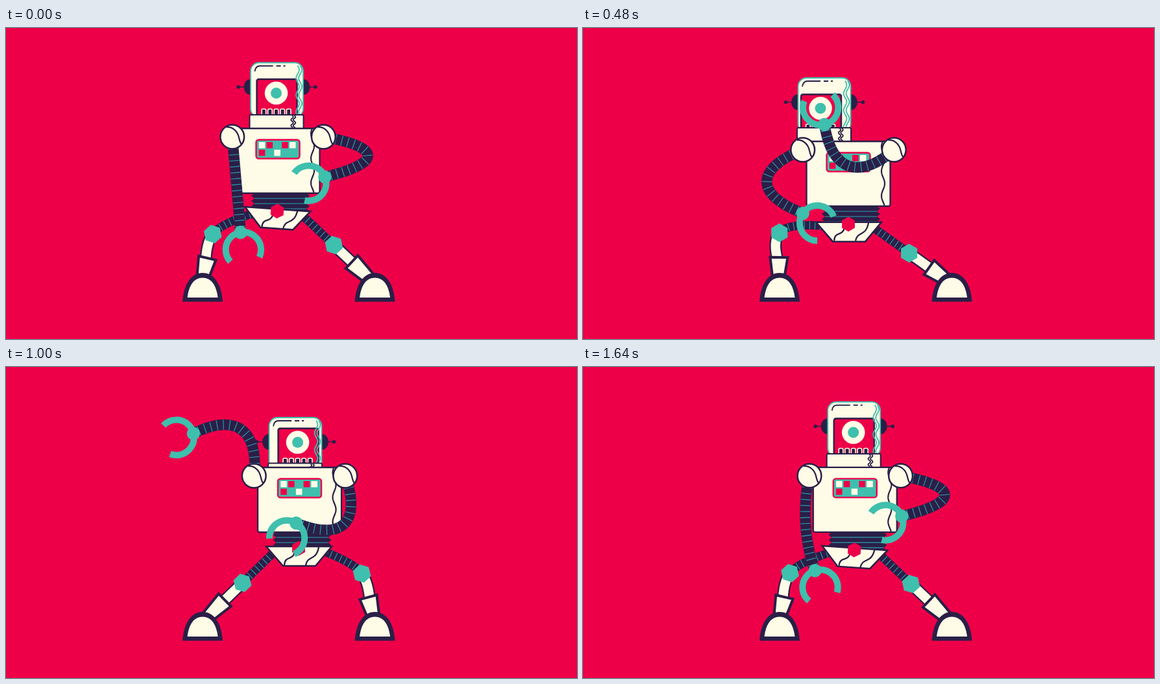
An HTML page with a canvas that plays this animation: 880 by 480 pixels, repeating every 1.68 s.

```html
<!DOCTYPE html>
<html lang="en">
<head>
<meta charset="utf-8">
<title>Robot dance</title>
<style>
html, body { margin: 0; width: 100%; height: 100%; overflow: hidden; background: #ee0049; }
canvas { display: block; width: 880px; height: 480px; }
</style>
</head>
<body>
<canvas id="stage" width="880" height="480"></canvas>
<script>
const g = document.getElementById('stage').getContext('2d');
const RED = '#ee0049', INK = '#2a1f47', CREAM = '#fefce6', TEAL = '#3fbfad', STRIPE = '#2d9fb4';
const LOOP = 1680, STEP = 40;
const ARM = 148, THIGH = 72, SHIN = 79, ANKLE_Y = 395, FOOT_Y = 422.5;

// Key poses; a field left out is interpolated across the gap.
// x, y: chest    lean, look, sink: head, face and head drop    swing, tilt: hips
// left, right: arm angle    leftLen, rightLen: reach    twist: right wrist
const poses = [
  { t: 0, x: 419, y: 168, lean: -1.5, look: 0, sink: 0, swing: -1, tilt: 4,
    left: 85, leftLen: 148, right: 88, rightLen: 62, twist: 4 },
  { t: 160, x: 414.5, y: 174, lean: -23.5, sink: 0, tilt: 4, left: 86, leftLen: 148, right: 115, rightLen: 44 },
  { t: 480, x: 409, y: 188, lean: -37, look: -5, sink: 3.5, swing: 0, tilt: 0,
    left: 90, leftLen: 98, right: 200, rightLen: 114, twist: 9 },
  { t: 680, x: 458, y: 193, lean: 14.5, sink: 4.5, swing: 8, tilt: 0,
    left: 83, leftLen: 104, right: 220, rightLen: 107, twist: 111 },
  { t: 1000, x: 452.5, y: 168, lean: -6.5, look: 4.5, sink: 24.5, swing: -1.5, tilt: 0,
    left: 215, leftLen: 114, right: 136, rightLen: 105, twist: 293 },
  { t: 1120, left: 227, leftLen: 146 },
  { t: 1320, x: 448, y: 156.5, lean: -7.5, sink: 59, swing: -9, tilt: 4,
    left: 226, leftLen: 148, right: 129, rightLen: 109, twist: 286 },
  { t: 1480, left: 156, leftLen: 106 }
];
poses.push({ ...poses[0], t: 1660, twist: poses[0].twist + 360 });

const tracks = {};
for (const name of Object.keys(poses[0])) {
  tracks[name] = poses.filter(p => name in p).map(p => [p.t, p[name]]);
}

// Monotone cubic interpolation, at rest at both ends.
function sample(keys, t) {
  let i = 0;
  while (i < keys.length - 2 && t >= keys[i + 1][0]) i++;
  const slope = k => (keys[k + 1][1] - keys[k][1]) / (keys[k + 1][0] - keys[k][0]);
  const tangent = k => {
    if (k === 0 || k === keys.length - 1) return 0;
    const p = slope(k - 1), q = slope(k);
    return p * q > 0 ? 2 * p * q / (p + q) : 0;
  };
  const [[t0, a], [t1, b]] = [keys[i], keys[i + 1]];
  const h = t1 - t0, u = Math.min(1, (t - t0) / h), w = 1 - u;
  return a * w * w * (1 + 2 * u) + b * u * u * (3 - 2 * u) + h * u * w * (w * tangent(i) - u * tangent(i + 1));
}

const rad = deg => deg * Math.PI / 180;
const clamp = (v, lo, hi) => Math.max(lo, Math.min(hi, v));

function paint(fill, stroke, width) {
  if (fill) { g.fillStyle = fill; g.fill(); }
  if (stroke) { g.strokeStyle = stroke; g.lineWidth = width; g.stroke(); }
}
function box(x, y, w, h, r, fill, stroke, width) {
  g.beginPath(); g.roundRect(x, y, w, h, r); paint(fill, stroke, width);
}
function disc(x, y, r, fill, stroke, width) {
  g.beginPath(); g.arc(x, y, r, 0, 7); paint(fill, stroke, width);
}
function poly(points, fill, stroke, width) {
  g.beginPath();
  points.forEach(p => g.lineTo(p[0], p[1]));
  g.closePath(); paint(fill, stroke, width);
}
function shape(d, fill, stroke, width) {
  const p = new Path2D(d);
  if (fill) { g.fillStyle = fill; g.fill(p); }
  if (stroke) { g.strokeStyle = stroke; g.lineWidth = width; g.stroke(p); }
}
function at(x, y, deg, draw) {
  g.save(); g.translate(x, y); g.rotate(rad(deg)); draw(); g.restore();
}
function hex(x, y, r, deg, fill) {
  at(x, y, deg, () => poly([0, 1, 2, 3, 4, 5].map(i => {
    const a = rad(i * 60 - 90);
    return [r * Math.cos(a), r * Math.sin(a)];
  }), fill));
}
function wave(x, y0, y1, amp, period, color, width, phase = 0) {
  g.beginPath();
  for (let y = y0; y <= y1; y++) g.lineTo(x + amp * Math.sin((y - y0 + phase) / period * 2 * Math.PI), y);
  paint(null, color, width);
}

// Ribbed hose along a cubic curve, with evenly spaced rings.
function hose(a, b, c, d, width, rings) {
  const pts = [], len = [0], N = 60;
  for (let i = 0; i <= N; i++) {
    const u = i / N, w = 1 - u;
    pts.push([0, 1].map(k => w * w * w * a[k] + 3 * w * w * u * b[k] + 3 * w * u * u * c[k] + u * u * u * d[k]));
    if (i) len.push(len[i - 1] + Math.hypot(pts[i][0] - pts[i - 1][0], pts[i][1] - pts[i - 1][1]));
  }
  g.beginPath(); pts.forEach(p => g.lineTo(p[0], p[1])); paint(null, INK, width);
  g.beginPath();
  for (let n = 1, i = 1; n < rings; n++) {
    const s = len[N] * n / rings;
    while (len[i] < s) i++;
    const p = pts[i - 1], q = pts[i], seg = len[i] - len[i - 1], f = (s - len[i - 1]) / seg;
    const dx = (q[0] - p[0]) / seg, dy = (q[1] - p[1]) / seg, r = width / 2 - .5;
    const x = p[0] + (q[0] - p[0]) * f, y = p[1] + (q[1] - p[1]) * f;
    g.moveTo(x - dy * r, y + dx * r); g.lineTo(x + dy * r, y - dx * r);
  }
  paint(null, STRIPE, 1.1);
}

// Two-bone leg on a fixed foot; the shin stretches when the leg is straight.
function leg(hx, hy, footX, ankleX, side, turn) {
  const vx = ankleX - hx, vy = ANKLE_Y - hy, reach = Math.hypot(vx, vy), ux = vx / reach, uy = vy / reach;
  const shin = Math.max(SHIN, reach - THIGH);
  const along = (THIGH * THIGH - shin * shin + reach * reach) / (2 * reach);
  const out = side * Math.sqrt(Math.max(0, THIGH * THIGH - along * along));
  const kx = hx + ux * along + uy * out, ky = hy + uy * along - ux * out;
  const dx = (kx - ankleX) / shin, dy = (ky - ANKLE_Y) / shin, cuff = shin - 38;

  const bx = kx - ux * 20, by = ky - uy * 20;
  const toBend = (x, y) => [x + (bx - x) * 2 / 3, y + (by - y) * 2 / 3];
  hose([hx, hy], toBend(hx, hy), toBend(kx, ky), [kx, ky], 13, 9);

  g.beginPath(); g.moveTo(kx, ky);
  g.quadraticCurveTo(kx + ux * 18, ky + uy * 18, ankleX + dx * (cuff - 10), ANKLE_Y + dy * (cuff - 10));
  paint(null, INK, 19); paint(null, CREAM, 14.5);

  at(ankleX, ANKLE_Y, Math.atan2(dy, dx) * 180 / Math.PI + 90, () =>
    poly([[-13.5, -cuff], [13.5, -cuff], [8.5, -6], [-8.5, -6]], CREAM, INK, 4));
  hex(kx, ky, 14.5, turn, TEAL);

  at(footX, FOOT_Y, 0, () => {
    shape('M-31 0C-29 -27 -18 -44.500 0 -44.500S29 -27 31 0Z', INK);
    shape('M-23.500 -6.500C-21 -26 -13 -37 0 -37S21 -26 23.500 -6.500Z', CREAM);
  });
}

function bellows(x, y, len) {
  const edge = s => {
    const pts = [];
    for (let h = 0; h <= len; h += 4) pts.push([s * (h / 4 % 2 ? 45 : 40), h]);
    return pts;
  };
  at(x, y, 0, () => {
    poly(edge(-1).concat(edge(1).reverse()), INK);
    g.beginPath();
    for (let h = 8; h < len; h += 8) { g.moveTo(-40, h); g.lineTo(40, h); }
    paint(null, STRIPE, 1.1);
  });
}

function pelvis(x, y, tilt) {
  at(x, y, tilt, () => {
    poly([[-50, -3], [51, -3], [26, 27], [-24, 27]], CREAM, INK, 2.5);
    shape('M-22 26C-21 10 -9 20 -6 5M11 26C14 10 27 20 31 -2', null, INK, 2.3);
    hex(0, 0, 11.5, 0, RED);
  });
}

// Sinking into the chest, the head first takes the neck along, then the face slides up.
function head(x, chestY, sink, look) {
  const drop = Math.max(0, sink - 5), shift = -Math.min(11, drop * .45);
  at(x, chestY - 115 + sink, 0, () => {
    for (const s of [-1, 1]) {
      g.beginPath(); g.ellipse(s * 41, 38, 10, 12, 0, 0, 7); paint(INK);
      g.beginPath(); g.moveTo(s * 48, 38); g.lineTo(s * 59, 38); paint(null, INK, 1.5);
      disc(s * 59.5, 38, 2.8, INK);
    }
    box(-40.5, .5, 81, 84, 13, CREAM, TEAL, 1.8);
    shape('M-34 14Q-33 5.500 -26 5.500H-6M-1 5.500H6M10 5.500H13', null, INK, 1.8);
    at(look, shift, 0, () => {
      box(-31, 26, 62, 64, 3, RED, INK, 2.4);
      disc(-1, 47.5, 17.8, CREAM);
      disc(-1, 47.5, 8.5, TEAL);
      for (let i = 0; i < 5; i++) box(-23.5 + i * 9.6, 72, 6.6, 14, 2, INK, CREAM, 1.6);
    });
    for (const wx of [32, 36]) wave(wx, 5, 82, 2.4, 26, TEAL, 1.8);
  });
  at(x, chestY - 34 + Math.min(14.5, drop), 0, () => {
    box(-42, 0, 83, 24, 2, CREAM, INK, 2);
    for (const wx of [23.5, 27]) wave(wx, 1, 20, 1.8, 9, INK, 1.8);
  });
}

const cells = ['wr.rw', 'r.w..'];
function torso(x, y) {
  at(x, y, 0, () => {
    box(-64.5, -13, 129, 100, 3, CREAM, INK, 2.3);
    wave(53.5, -12, 86, 2.5, 38, INK, 2.2, -16.5);
    box(-33.5, 4.5, 67, 29, 4, TEAL, RED, 2.4);
    cells.forEach((row, j) => [...row].forEach((c, i) => {
      if (c !== '.') box(-29.3 + i * 11.8, 8 + j * 11.8, 9.6, 9.6, 0, c === 'r' ? RED : CREAM);
    }));
  });
}

// The shorter the reach, the more the arm bows outward and the wrist turns in.
function arm(x, y, angle, reach, side, twist) {
  const ux = Math.cos(rad(angle)), uy = Math.sin(rad(angle));
  const bow = .67 * Math.sqrt(Math.max(0, ARM * ARM - reach * reach));
  const point = (along, out) => [
    x + ux * reach * along + side * uy * bow * out,
    y + uy * reach * along - side * ux * bow * out
  ];
  const wrist = point(1, 0);
  hose([x, y], point(.28, .93), point(.68, 1.06), wrist, 16.5, 16);
  disc(x, y, 18.4, CREAM, INK, 2.5);
  at(x, y, 0, () => shape('M-9 -15C1 -16 8 -8 10 0S12 9 14 11', null, INK, 2.2));
  at(...wrist, angle + side * (4 + .7 * bow) + twist, () => {
    g.beginPath(); g.arc(27, 0, 27.2, .98, 2 * Math.PI - .98); paint(null, TEAL, 10);
    disc(0, 0, 10.2, TEAL);
  });
}

function draw(t) {
  const p = {};
  for (const name in tracks) p[name] = sample(tracks[name], t);
  const hx = p.x + p.swing, hy = p.y + 115 + p.swing * .4 - p.sink * .1;
  const turn = clamp((hy - 303) * .6, -25, 0);
  g.fillStyle = RED;
  g.fillRect(0, 0, 880, 480);
  leg(hx - 35, hy + 3, 303, 301, -1, turn);
  leg(hx + 35, hy + 3, 568.5, 569, 1, turn);
  bellows(p.x + 4, p.y + 87, 28 + p.sink * .22);
  pelvis(hx, hy, p.tilt);
  head(p.x + p.lean, p.y, p.sink, p.look);
  torso(p.x, p.y);
  arm(p.x - 70.3, p.y, p.left, p.leftLen, -1, 0);
  arm(p.x + 70.3, p.y, p.right, p.rightLen, 1, p.twist);
}

let start;
function tick(now) {
  start ??= now;
  draw(Math.floor((now - start) % LOOP / STEP) * STEP);
  requestAnimationFrame(tick);
}
draw(0);
requestAnimationFrame(tick);
</script>
</body>
</html>
```
